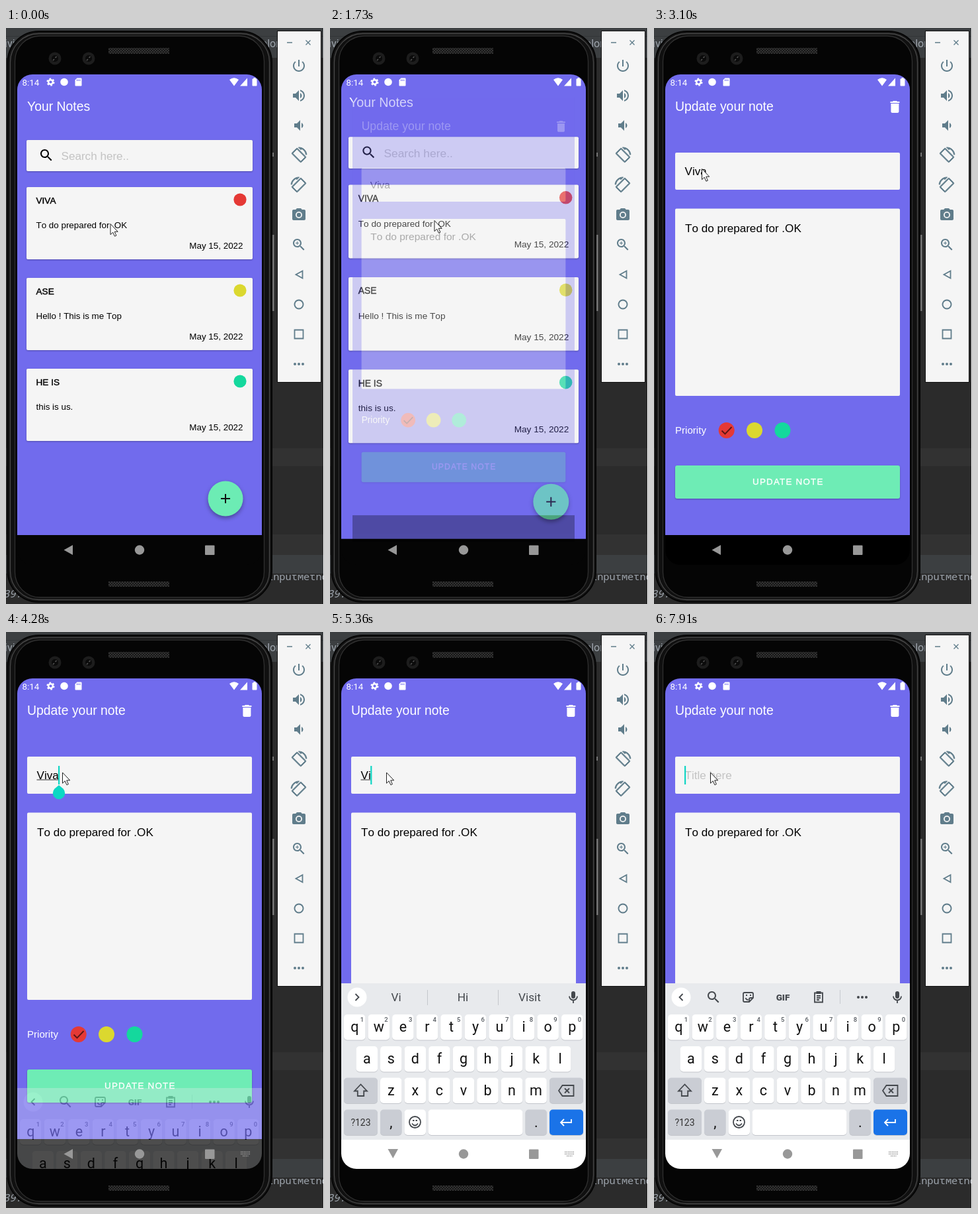
These frames come from a looping animation (481 px wide and 869 px high, 8 s). An HTML page:

```html
<!DOCTYPE html>
<html lang="en">
<head>
<meta charset="utf-8">
<title>Notes app</title>
<style>
html, body { margin: 0; width: 100%; height: 100%; overflow: hidden; background: #2b2b2b; }
svg { display: block; width: 481px; height: 869px; }
text { font-family: "Liberation Sans", Arial, sans-serif; white-space: pre; }
.title { font-size: 19.4px; fill: #fff; }
.field { font-size: 17.1px; font-kerning: none; }
.hint { fill: #c3c3c3; }
.small { font-size: 13.4px; font-kerning: none; }
.head { font-size: 13.6px; stroke: #000; stroke-width: .4; }
.btn { font-size: 13.4px; letter-spacing: 1.2px; fill: #fff; stroke: #fff; stroke-width: .35; }
.robo, .kb text { font-family: Roboto, sans-serif; }
.kb .key { font-size: 21.5px; fill: #111; }
.kb .sup { font-size: 9.5px; fill: #555a60; font-weight: 500; }
.kb .word { font-size: 17.3px; fill: #44484d; }
.code { font-family: "Noto Sans Mono", monospace; font-size: 15.3px; fill: #9da4ac; }
.mid { text-anchor: middle; }
.end { text-anchor: end; }
.line { fill: none; stroke: #44484d; stroke-width: 1.8; }
.card { fill: #f5f5f5; filter: drop-shadow(0 1px 1px rgba(0,0,0,.28)); }
.fab { fill: #6cecb4; filter: drop-shadow(0 3px 3px rgba(0,0,0,.35)); }
</style>
</head>
<body>
<svg viewBox="0 0 481 869">
<defs>
  <clipPath id="screen"><rect x="17" y="70" width="370" height="740" rx="23"/></clipPath>
  <clipPath id="cut"><rect x="400" y="825" width="81" height="14"/></clipPath>
  <pattern id="mesh" width="4" height="4" patternUnits="userSpaceOnUse">
    <rect width="4" height="4" fill="#171717"/>
    <path d="M0 0l4 4M4 0l-4 4" stroke="#3a3a3a" stroke-width=".8"/>
  </pattern>
  <path id="search" d="M15.5 14h-.79l-.28-.27C15.41 12.59 16 11.11 16 9.5 16 5.91 13.09 3 9.5 3S3 5.91 3 9.5 5.91 16 9.5 16c1.61 0 3.09-.59 4.23-1.57l.27.28v.79l5 4.99L20.49 19l-4.99-5zm-6 0C7.01 14 5 11.99 5 9.5S7.01 5 9.5 5 14 7.01 14 9.5 11.99 14 9.5 14z"/>
  <path id="turn" stroke="#607d8b" stroke-width=".9" d="M16.48 2.52c3.27 1.55 5.61 4.72 5.97 8.48h1.5C23.44 4.84 18.29 0 12 0l-.66.03 3.81 3.81zM10.23 1.75c-.59-.59-1.54-.59-2.12 0L1.75 8.11c-.59.59-.59 1.54 0 2.12l12.02 12.02c.59.59 1.54.59 2.12 0l6.36-6.36c.59-.59.59-1.54 0-2.12zm4.6 19.44L2.81 9.17l6.36-6.36 12.02 12.02z"/>
</defs>

<!-- editor behind the emulator -->
<rect width="481" height="869" fill="#2b2b2b"/>
<rect width="481" height="45" fill="#3c3f41"/>
<path d="M0 12.5h481" stroke="#323537"/>
<path d="M0 634h481v27H0zM0 764h481v31H0z" fill="#323232"/>
<path d="M0 795h481v28H0z" fill="#3c3f41"/>
<text x="-2" y="29" class="robo" font-size="16" fill="#9da4ac">ivi</text>
<text x="386" y="29" class="robo" font-size="16" fill="#9da4ac">olor</text>
<g clip-path="url(#cut)"><text x="395" y="833" class="code">inputMethod</text></g>
<text x="-4" y="859" class="code" font-style="italic">39:</text>
<rect x="480" width="1" height="869" fill="#fff"/>

<!-- phone body -->
<path d="M404 312v115" stroke="#777" stroke-width="3"/>
<path d="M404 188v6" stroke="#777" stroke-width="2"/>
<rect x="2.5" y="5" width="399.500" height="861" rx="47" fill="#161616" stroke="#050505" stroke-width="2"/>
<rect x="6.500" y="8.500" width="392" height="854" rx="43" fill="#101010" stroke="#484848" stroke-width="1.300"/>
<rect x="13.500" y="12" width="377" height="847" rx="38" fill="#050505" stroke="#303030" stroke-width="1.300"/>
<path d="M155 30h92v9h-92zM155 835h92v8h-92z" fill="url(#mesh)"/>
<g id="lens"><circle cx="74" cy="46" r="9.5" fill="#1d1d1d"/><circle cx="74" cy="46" r="5" fill="#0b0b0b"/><path d="M76.500 43l-2 2m-1.500 2l-2 2" stroke="#555" stroke-width="1.5"/></g>
<use href="#lens" x="51"/>

<g clip-path="url(#screen)">
  <rect x="17" y="70" width="370" height="740" fill="#050505"/>
  <g id="list">
    <rect x="17" y="70" width="370" height="695" fill="#716bed"/>
    <text x="32" y="125" class="title">Your Notes</text>
    <rect x="31" y="169" width="342" height="47" rx="2" class="card"/>
    <use href="#search" x="49" y="180"/>
    <text x="83.500" y="199" class="field hint">Search here..</text>
    <g id="notes"></g>
    <circle cx="332" cy="710" r="26.500" class="fab"/>
    <path d="M325 710h14M332 703v14" stroke="#111" stroke-width="2"/>
  </g>
  <g id="edit">
    <rect x="17" y="70" width="370" height="695" fill="#716bed"/>
    <rect x="17" y="765" width="370" height="45"/>
    <text x="32" y="125" class="title">Update your note</text>
    <path transform="translate(352.400 107)" fill="#fff" d="M6 19c0 1.1.9 2 2 2h8c1.1 0 2-.9 2-2V7H6v12zM19 4h-3.5l-1-1h-5l-1 1H5v2h14V4z"/>
    <path d="M34 188h336q2 0 2 2v52q0 2-2 2H34q-2 0-2-2v-52q0-2 2-2zM34 272.500h336q2 0 2 2v278.500q0 2-2 2H34q-2 0-2-2v-278.500q0-2 2-2z" fill="#f5f5f5"/>
    <text x="46.500" y="222" class="field" id="name"></text>
    <rect id="under" x="46.500" y="222.500" height="1" fill="#333"/>
    <text x="47" y="307.500" class="field">To do prepared for .OK</text>
    <text x="32" y="612" font-size="15.100" fill="#fff">Priority</text>
    <circle cx="109.700" cy="607" r="12" fill="#e53935"/>
    <circle cx="152" cy="607" r="12" fill="#dbd82f"/>
    <circle cx="194.500" cy="607" r="12" fill="#14d89d"/>
    <path d="M102.500 607.500l5 5 10-10.500" fill="none" stroke="#5b1715" stroke-width="1.900"/>
    <rect x="32" y="660" width="340" height="50" rx="3" class="card" style="fill:#6eecb5"/>
    <text x="202.800" y="689" class="btn mid">UPDATE NOTE</text>
    <rect id="caret" y="202" width="2.200" height="28" fill="#10d6c4"/>
    <path id="drop" d="M80 231l6.500 5.500a9.200 9.200 0 1 1-13 0z" fill="#0cd8c4"/>
  </g>

  <g id="kb" class="kb">
    <rect x="17" y="530" width="370" height="237" fill="#e8eaed"/>
    <rect x="17" y="766" width="370" height="44" fill="#fff"/>
    <circle cx="41" cy="551" r="14.500" fill="#fff"/>
    <path id="chev" class="line"/>
    <g id="tools">
      <use href="#search" x="78" y="539" fill="#44484d"/>
      <path class="line" d="M137 544h11q2 0 2 2v6l-6 6h-7q-2 0-2-2v-10q0-2 2-2zM150 552h-4q-2 0-2 2v4M138.500 552q1 3 4 3M139 548h2m4 0h2" stroke-width="1.600"/>
      <text x="195" y="556" class="mid" font-size="13.500" font-weight="900" fill="#44484d">GIF</text>
      <path class="line" d="M243 544.500h12v14h-12zM246 549h6m-6 3h6m-6 3h4"/>
      <path d="M245.500 542h7v4h-7z" fill="#44484d"/>
      <path d="M281.500 540v21" stroke="#c8cbd0"/>
      <g fill="#44484d"><circle cx="309" cy="551" r="2"/><circle cx="315" cy="551" r="2"/><circle cx="321" cy="551" r="2"/></g>
    </g>
    <g id="hints">
      <path d="M147.500 540v23M254.500 540v23" stroke="#c4c7cc"/>
      <text x="100" y="557" class="word mid"></text>
      <text x="201" y="557" class="word mid"></text>
      <text x="302" y="557" class="word mid"></text>
    </g>
    <rect x="365" y="542" width="6" height="11" rx="3" fill="#44484d"/>
    <path class="line" d="M362 549.500a6 6 0 0 0 12 0M368 556v4"/>
    <g id="keys"></g>
    <path class="line" d="M46.500 682.500l-9.500 10h4.800v7.500h9.400v-7.500h4.800z"/>
    <path class="line" d="M346 692l5.500-8h17v16h-17zM355 688.500l7 7m0-7l-7 7"/>
    <circle cx="128.500" cy="739.500" r="8.500" class="line"/>
    <path class="line" d="M124 741.500q4.500 6 9 0M125 737h2.500m2 0h2.500"/>
    <path class="line" style="stroke:#fff" d="M365 735v5h-16m5-5l-5 5 5 5"/>
  </g>

  <!-- status and navigation bars -->
  <text x="24.500" y="86.500" class="robo" font-size="13.400" fill="#fff">8:14</text>
  <g fill="none" stroke="#fff"><circle cx="67.500" cy="81.500" r="3.300" stroke-width="2.400"/><circle cx="67.500" cy="81.500" r="5" stroke-width="2.200" stroke-dasharray="2.618"/></g>
  <circle cx="88" cy="81.500" r="5.800" fill="#fff"/>
  <path d="M107.500 75.500h6q1 0 1 1v10q0 1-1 1h-8q-1 0-1-1v-8zM338 78q7-5.500 14 0l-7 9.500zM365 75.500v12h-11zM373.500 76.500h1v-1.500h3v1.500h1q1 0 1 1v9q0 1-1 1h-5q-1 0-1-1v-9q0-1 1-1z" fill="#fff"/>
  <path d="M107.500 77.500v2.500m2.200-2.500v2.500m2.200-2.500v2.500" stroke="#716bed"/>
  <g fill="#989898">
    <path id="back"/>
    <circle cx="202" cy="787.500" r="7.200"/>
    <rect x="301" y="780.500" width="14.500" height="14.500" rx="1"/>
    <path id="grid" d="M355 784.500h14.500M355 787.500h14.500M358 790.500h8.500" fill="none" stroke="#989898" stroke-width="1.500" stroke-dasharray="1.500 1"/>
  </g>
</g>

<!-- emulator tool panel -->
<rect x="410.500" y="4.500" width="66" height="530" fill="#f5f5f5" stroke="#111"/>
<path d="M425 22h8M453.500 18.500l7 7m0-7l-7 7" stroke="#607d8b" stroke-width="1.400"/>
<g id="panel" fill="#607d8b"></g>

<path id="mouse" d="M.5.5v16.200l3.700-3.500 2.700 6 2.500-1.100-2.700-5.800h5z" fill="#fff" stroke="#222"/>
</svg>

<script>
const $ = id => document.getElementById(id);
const LOOP = 8000;

const notes = [
  ["VIVA", "To do prepared for .OK", "#e53935"],
  ["ASE", "Hello ! This is me Top", "#dbd82f"],
  ["HE IS", "this is us.", "#14d89d"]
];
$("notes").innerHTML = notes.map(([head, body, color], i) =>
  `<g transform="translate(0 ${137 * i})"><rect x="31" y="240" width="342" height="109" rx="2" class="card"/>
  <text x="45.500" y="265" class="head">${head}</text><text x="45.500" y="302" class="small">${body}</text>
  <text x="358.500" y="333" class="small end">May 15, 2022</text><circle cx="354" cy="259" r="9.600" fill="${color}"/></g>`).join("");

// keyboard
const key = (x, y, w, label = "", fill = "#fff", cls = "key") =>
  `<rect x="${x}" y="${y + 1}" width="${w}" height="38.500" rx="5" fill="#c3c6cb"/>
  <rect x="${x}" y="${y}" width="${w}" height="38.500" rx="5" fill="${fill}"/>
  <text class="${cls} mid" x="${x + w / 2}" y="${y + 26}">${label}</text>`;
const row = (chars, x, y) => [...chars].map((c, i) => key(x + 36.55 * i, y, 32.5, c)).join("");
const gray = "#cacdd4";
$("keys").innerHTML =
  row("qwertyuiop", 21, 577) +
  [..."1234567890"].map((d, i) => `<text class="sup mid" x="${48.5 + 36.55 * i}" y="588">${d}</text>`).join("") +
  row("asdfghjkl", 39.5, 625) +
  key(21, 672.5, 51, "", gray) + row("zxcvbnm", 76, 672.5) + key(332, 672.5, 51, "", gray) +
  key(21, 720.5, 51, "", gray) + `<text class="mid" x="46.500" y="745" font-size="14" fill="#333">?123</text>` +
  key(76, 720.5, 32.5, ",", gray) + key(112.5, 720.5, 32.5) + key(148.5, 720.5, 143) +
  key(295.5, 720.5, 32.5, ".", gray) + key(332, 720.5, 51, "", "#1a73e8");

// tool panel icons, one every 45 px
const speaker = "M3 9v6h4l5 5V4L7 9H3zm13.5 3c0-1.77-1.02-3.29-2.5-4.03v8.05c1.48-.73 2.5-2.25 2.5-4.02z";
const stroked = d => `<path d="${d}" fill="none" stroke="#607d8b" stroke-width="1.800"/>`;
const icons = [
  `<path d="M13 3h-2v10h2V3zm4.830 2.170l-1.420 1.420C17.990 7.860 19 9.810 19 12c0 3.870-3.130 7-7 7s-7-3.130-7-7c0-2.190 1.010-4.140 2.580-5.420L6.170 5.170C4.230 6.820 3 9.260 3 12c0 4.970 4.030 9 9 9s9-4.030 9-9c0-2.740-1.230-5.180-3.170-6.830z"/>`,
  `<path d="${speaker}M14 3.230v2.060c2.890.860 5 3.540 5 6.710s-2.110 5.850-5 6.710v2.060c4.010-.910 7-4.490 7-8.770s-2.990-7.860-7-8.770z"/>`,
  `<path transform="translate(2 0)" d="${speaker}"/>`,
  `<use href="#turn"/>`,
  `<use href="#turn" transform="translate(24 0) scale(-1 1)"/>`,
  `<path fill-rule="evenodd" d="M9 2L7.170 4H4c-1.100 0-2 .900-2 2v12c0 1.100.900 2 2 2h16c1.100 0 2-.900 2-2V6c0-1.100-.900-2-2-2h-3.170L15 2zM12 17a5 5 0 1 1 0-10 5 5 0 0 1 0 10z"/><circle cx="12" cy="12" r="3.200"/>`,
  `<use href="#search"/><path d="M12 10h-2v2H9v-2H7V9h2V7h1v2h2z"/>`,
  stroked("M17.500 6.500v11L7.500 12z"),
  stroked("M12 5.500a6.500 6.500 0 1 0 .01 0z"),
  stroked("M5.500 5.500h13v13h-13z"),
  `<circle cx="6" cy="12" r="2"/><circle cx="12" cy="12" r="2"/><circle cx="18" cy="12" r="2"/>`
];
$("panel").innerHTML = icons.map((s, i) => `<g transform="translate(431 ${45 + 45 * i})">${s}</g>`).join("");

// each track: [start, ...values], held until the next entry
const tracks = {
  mouse: [[0, 157.5, 295], [130, 157.5, 290], [2520, 185, 302], [2670, 204, 308], [2830, 133, 262],
    [2950, 83, 227], [3100, 72, 212], [3250, 76, 212], [3370, 82, 211.5], [3490, 85, 211.5]],
  list: [[0, 1, 1], [1730, 1.0176, 1], [1870, 1.048, .4], [1990, 1, 0]],
  edit: [[0, 1, 0], [1730, .908, .3], [1870, .9945, 1], [1990, 1, 1]],
  kb: [[0, 0, 0], [4160, 222, .1], [4280, 158, .3], [4420, 16, .88], [4540, 0, 1]],
  name: [[0, "Viva", 79], [5360, "Vi", 61.2], [5610, "V", 57.2], [5860, "", 46]],
  caret: [[0, 0], [4030, 1], [4690, 0], [5360, 1], [6380, 0], [6880, 1], [7410, 0], [7910, 1]],
  words: [[0], [4540, "Viva", "Vivid", "Vivace"], [5360, "Vi", "Hi", "Visit"], [5610, "V", "Very", "Via"], [5980]]
};
const at = (track, t) => tracks[track].filter(e => e[0] <= t).pop().slice(1);
const show = (id, on) => { $(id).style.display = on ? "" : "none"; };
const words = $("hints").querySelectorAll("text");

function page(id, t) {
  const [size, alpha] = at(id, t);
  $(id).setAttribute("transform", `translate(202 440) scale(${size}) translate(-202 -440)`);
  $(id).setAttribute("opacity", alpha);
}

function draw(t) {
  $("mouse").setAttribute("transform", `translate(${at("mouse", t)})`);
  page("list", t);
  page("edit", t);

  const [name, end] = at("name", t);
  $("name").textContent = name || "Title here";
  $("name").classList.toggle("hint", !name);
  $("under").setAttribute("width", Math.max(0, end - 46.5));
  show("under", t >= 4030 && name);
  $("caret").setAttribute("x", end);
  show("caret", at("caret", t)[0]);
  show("drop", t >= 4030 && t < 5360);

  const [dy, fade] = at("kb", t);
  $("kb").setAttribute("transform", `translate(0 ${dy})`);
  $("kb").setAttribute("opacity", fade);
  const list = at("words", t);
  show("hints", list.length);
  show("tools", !list.length);
  words.forEach((w, i) => { w.textContent = list[i] || ""; });
  $("chev").setAttribute("d", list.length ? "M38.500 546l5 5-5 5" : "M43.500 546l-5 5 5 5");
  $("back").setAttribute("d", t < 4690 ? "M87.500 787.500l13.500-7.500v15z" : "M87.500 780h15.500l-7.700 14z");
  show("grid", t >= 4160);
}

const start = performance.now();
function tick() {
  draw((performance.now() - start) % LOOP);
  requestAnimationFrame(tick);
}
tick();
</script>
</body>
</html>
```
